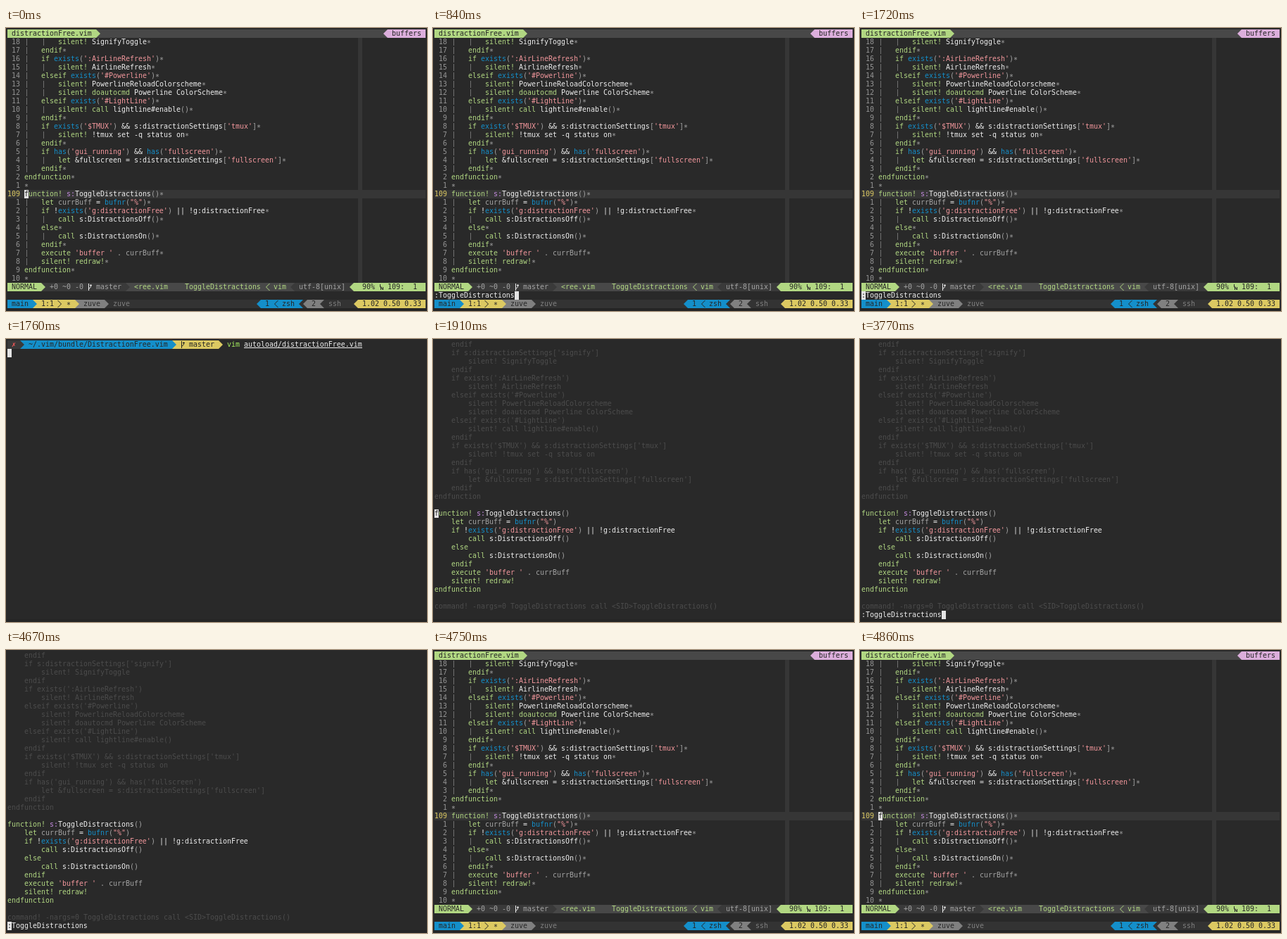
Animation, 598 px wide and 402 px high, one loop 4940 ms. Source, as an HTML page:

```html
<!DOCTYPE html>
<html lang="en">
<head>
<meta charset="utf-8">
<title>Distraction free toggle</title>
<style>
html, body { margin: 0; width: 100%; height: 100%; overflow: hidden; background: #292929; }
svg { display: block; width: 598px; height: 402px; }
text { font: 9.966px "DejaVu Sans Mono", monospace; white-space: pre; }
</style>
</head>
<body>
<svg id="stage" viewBox="0 0 598 402" xmlns="http://www.w3.org/2000/svg"></svg>
<script>
const C = {
  bg: '#292929', edge: '#252525', line: '#363636', text: '#eeeeee', grey: '#a4a4a4',
  num: '#959595', bar: '#707070', dim: '#4c4c4c', green: '#b1d782', blue: '#148fca',
  pink: '#f2979c', purple: '#c58be0', yellow: '#dcc962', mid: '#3a3a3a', soft: '#333333',
  light: '#484848', lilac: '#dcaedc', steel: '#808080', red: '#ff5a5a', dark: '#262626',
  cursor: '#e4e4e4'
};
const W = 6, H = 12, PAD = 2, COLS = 99;
const stage = document.getElementById('stage');
const X = col => PAD + col * W;
const Y = row => PAD + row * H;

function node(parent, tag, attrs) {
  const el = document.createElementNS('http://www.w3.org/2000/svg', tag);
  for (const k in attrs) el.setAttribute(k, attrs[k]);
  parent.appendChild(el);
  return el;
}

function put(g, col, row, str, fill, extra) {
  const el = node(g, 'text', { x: X(col), y: Y(row) + 9, fill, ...extra });
  el.textContent = str;
  return el;
}

function fill(g, from, to, row, color, rows = 1) {
  return node(g, 'rect', { x: X(from), y: Y(row), width: (to - from) * W, height: rows * H, fill: color });
}

// Solid separator, one cell wide; dir 1 points right, -1 left.
function wedge(g, col, row, dir, color) {
  const a = X(dir > 0 ? col : col + 1), y = Y(row);
  node(g, 'path', { d: `M${a} ${y}l${dir * W} ${H / 2}l${-dir * W} ${H / 2}z`, fill: color });
}

function chevron(g, col, row, dir, color) {
  const a = X(dir > 0 ? col : col + 1) - dir * 0.5, y = Y(row);
  node(g, 'path', { d: `M${a} ${y + 1}l${dir * 5} 5l${-dir * 5} 5`, fill: 'none', stroke: color });
}

function branch(g, col, row, color) {
  const x = X(col), y = Y(row);
  node(g, 'path', {
    d: `M${x + 1.5} ${y + 1}v10M${x + 1.5} ${y + 8.5}l3 -2.5v-3M${x + 3} ${y + 4}l1.5 -1.5l1.5 1.5`,
    fill: 'none', stroke: color
  });
}

const code = `    endif
    if s:distractionSettings['signify']
        silent! SignifyToggle
    endif
    if exists(':AirLineRefresh')
        silent! AirlineRefresh
    elseif exists('#Powerline')
        silent! PowerlineReloadColorscheme
        silent! doautocmd Powerline ColorScheme
    elseif exists('#LightLine')
        silent! call lightline#enable()
    endif
    if exists('$TMUX') && s:distractionSettings['tmux']
        silent! !tmux set -q status on
    endif
    if has('gui_running') && has('fullscreen')
        let &fullscreen = s:distractionSettings['fullscreen']
    endif
endfunction

function! s:ToggleDistractions()
    let currBuff = bufnr("%")
    if !exists('g:distractionFree') || !g:distractionFree
        call s:DistractionsOff()
    else
        call s:DistractionsOn()
    endif
    execute 'buffer ' . currBuff
    silent! redraw!
endfunction

command! -nargs=0 ToggleDistractions call <SID>ToggleDistractions()`.split('\n');

const token = new RegExp([
  /(?<pink>'[^']*'|"[^"]*")/,
  /(?<blue>\b(?:exists|has|bufnr)(?=\())/,
  /(?<green>\b(?:function|silent|redraw)!|\b(?:endfunction|endif|elseif|else|if|let|call|execute|doautocmd)\b)/,
  /(?<purple>s:(?=Toggle))/,
  /(?<grey>[()\[\]]+|\.|currBuff)/,
  /(?<text>!(?=exists)|[^\s()\[\]'"]+)/
].map(r => r.source).join('|'), 'g');

function codeLine(g, col, row, str, color) {
  for (const m of str.matchAll(token)) {
    const kind = Object.keys(m.groups).find(k => m.groups[k]);
    put(g, col + m.index, row, m[0], color || C[kind]);
  }
}

function drawTabs(g) {
  fill(g, 0, COLS, 0, C.light);
  fill(g, 0, 21, 0, C.green);
  wedge(g, 21, 0, 1, C.green);
  put(g, 1, 0, 'distractionFree.vim', C.dark);
  wedge(g, 89, 0, -1, C.lilac);
  fill(g, 90, COLS, 0, C.lilac);
  put(g, 91, 0, 'buffers', C.dark);
}

function drawBuffer(g) {
  fill(g, 0, COLS, 19, C.line);
  fill(g, 83, 84, 1, C.line, 29);
  for (let row = 1; row < 30; row++) {
    const str = code[row + 1], here = row === 19;
    const n = here ? '109' : String(Math.abs(row - 19));
    put(g, 3 - n.length, row, n, here ? C.yellow : C.num);
    const indent = str.search(/\S|$/);
    for (let c = 4; c < 4 + indent; c += 4) {
      node(g, 'rect', { x: X(c) + 3, y: Y(row) + 1, width: 1, height: 10, fill: C.bar });
    }
    codeLine(g, 4, row, str);
    put(g, 4 + str.length, row, '*', C.grey, { dy: 2 });
  }
}

function drawStatus(g, row) {
  fill(g, 0, COLS, row, C.mid);
  fill(g, 28, 67, row, C.light);
  wedge(g, 28, row, 1, C.mid);
  fill(g, 0, 8, row, C.green);
  wedge(g, 8, row, 1, C.green);
  put(g, 1, row, 'NORMAL', C.dark, { 'font-weight': 'bold' });
  put(g, 10, row, '+0 ~0 -0', C.grey);
  branch(g, 19, row, C.text);
  put(g, 21, row, 'master', C.grey);
  put(g, 30, row, '<ree.vim', C.green);
  put(g, 42, row, 'ToggleDistractions', C.green);
  chevron(g, 61, row, -1, C.green);
  put(g, 63, row, 'vim', C.green);
  fill(g, 67, 68, row, C.light);
  wedge(g, 67, row, -1, C.mid);
  put(g, 69, row, 'utf-8[unix]', C.grey);
  wedge(g, 81, row, -1, C.green);
  fill(g, 82, COLS, row, C.green);
  put(g, 84, row, '90%', C.dark);
  const x = X(88), y = Y(row);
  node(g, 'path', {
    d: `M${x + 1.5} ${y + 2}v4h2M${x + 2.5} ${y + 10}v-4l3 4v-4`,
    fill: 'none', stroke: C.dark
  });
  put(g, 90, row, '109:  1', C.dark);
}

function drawMux(g, row) {
  fill(g, 0, COLS, row, C.soft);
  fill(g, 16, 23, row, C.steel);
  wedge(g, 23, row, 1, C.steel);
  fill(g, 6, 16, row, C.yellow);
  wedge(g, 16, row, 1, C.yellow);
  fill(g, 0, 6, row, C.blue);
  wedge(g, 6, row, 1, C.blue);
  put(g, 1, row, 'main', C.dark);
  put(g, 8, row, '1:1', C.dark);
  chevron(g, 12, row, 1, C.dark);
  put(g, 14, row, '*', C.dark, { dy: 2 });
  put(g, 18, row, 'zuve', C.dark);
  put(g, 25, row, 'zuve', C.steel);
  wedge(g, 59, row, -1, C.blue);
  fill(g, 60, 70, row, C.blue);
  wedge(g, 69, row, -1, C.soft);
  put(g, 61, row, '1', C.dark);
  chevron(g, 63, row, -1, C.dark);
  put(g, 65, row, 'zsh', C.dark);
  wedge(g, 70, row, -1, C.steel);
  fill(g, 71, 75, row, C.steel);
  wedge(g, 74, row, -1, C.soft);
  put(g, 72, row, '2', C.dark);
  put(g, 76, row, 'ssh', C.steel);
  wedge(g, 82, row, -1, C.yellow);
  fill(g, 83, COLS, row, C.yellow);
  put(g, 84, row, '1.02 0.50 0.33', C.dark);
}

function buildEditor() {
  const g = node(stage, 'g', {});
  drawTabs(g);
  drawBuffer(g);
  drawStatus(g, 30);
  drawMux(g, 32);
  return g;
}

function buildFocus() {
  const g = node(stage, 'g', {});
  code.forEach((str, row) => codeLine(g, 0, row, str, row < 20 || row > 29 ? C.dim : null));
  return g;
}

function buildShell() {
  const g = node(stage, 'g', {});
  fill(g, 39, 50, 0, C.yellow);
  wedge(g, 50, 0, 1, C.yellow);
  fill(g, 3, 39, 0, C.blue);
  wedge(g, 39, 0, 1, C.blue);
  fill(g, 0, 3, 0, C.mid);
  wedge(g, 3, 0, 1, C.mid);
  put(g, 1, 0, '✗', C.red);
  put(g, 5, 0, '~/.vim/bundle/DistractionFree.vim', C.dark);
  branch(g, 41, 0, C.dark);
  put(g, 43, 0, 'master', C.dark);
  put(g, 52, 0, 'vim', '#a8f060');
  put(g, 56, 0, 'autoload/distractionFree.vim', C.text);
  node(g, 'path', { d: `M${X(56)} ${Y(0) + 10.5}h${28 * W}`, stroke: C.text });
  return g;
}

node(stage, 'rect', { width: 598, height: 402, fill: C.edge });
node(stage, 'rect', { width: 598, height: 398, fill: C.bg });
const views = { editor: buildEditor(), focus: buildFocus(), shell: buildShell() };
const prompt = put(stage, 0, 0, '', C.text);
const block = fill(stage, 0, 1, 0, C.cursor);
const under = put(stage, 0, 0, '', C.dark);

const CMD = ':ToggleDistractions', LOOP = 4940;
// start, view, command text, cursor [col, row, letter]
const steps = [
  [0, 'editor', '', [4, 19, 'f']],
  [490, 'editor', ':', [1, 31]],
  [840, 'editor', CMD, [19, 31]],
  [1720, 'editor', CMD, [0, 31, ':']],
  [1760, 'shell', '', [0, 1]],
  [1800, 'focus', ''],
  [1910, 'focus', '', [0, 20, 'f']],
  [3290, 'focus', ':', [1, 32]],
  [3770, 'focus', CMD, [19, 32]],
  [4670, 'focus', CMD, [0, 32, ':']],
  [4710, 'shell', '', [0, 1]],
  [4750, 'editor', ''],
  [4860, 'editor', '', [4, 19, 'f']]
];

let shown;
function draw(t) {
  const step = steps.findLast(s => s[0] <= t);
  if (step === shown) return;
  shown = step;
  const [, view, cmd, cursor] = step;
  for (const k in views) views[k].setAttribute('display', k === view ? 'inline' : 'none');
  prompt.textContent = cmd;
  prompt.setAttribute('y', Y(view === 'focus' ? 32 : 31) + 9);
  block.setAttribute('display', cursor ? 'inline' : 'none');
  under.textContent = cursor && cursor[2] || '';
  if (!cursor) return;
  const x = X(cursor[0]), y = Y(cursor[1]);
  block.setAttribute('x', x);
  block.setAttribute('y', y);
  under.setAttribute('x', x);
  under.setAttribute('y', y + 9);
}

const start = performance.now();
function tick() {
  draw((performance.now() - start) % LOOP);
  requestAnimationFrame(tick);
}
draw(0);
requestAnimationFrame(tick);
</script>
</body>
</html>
```
